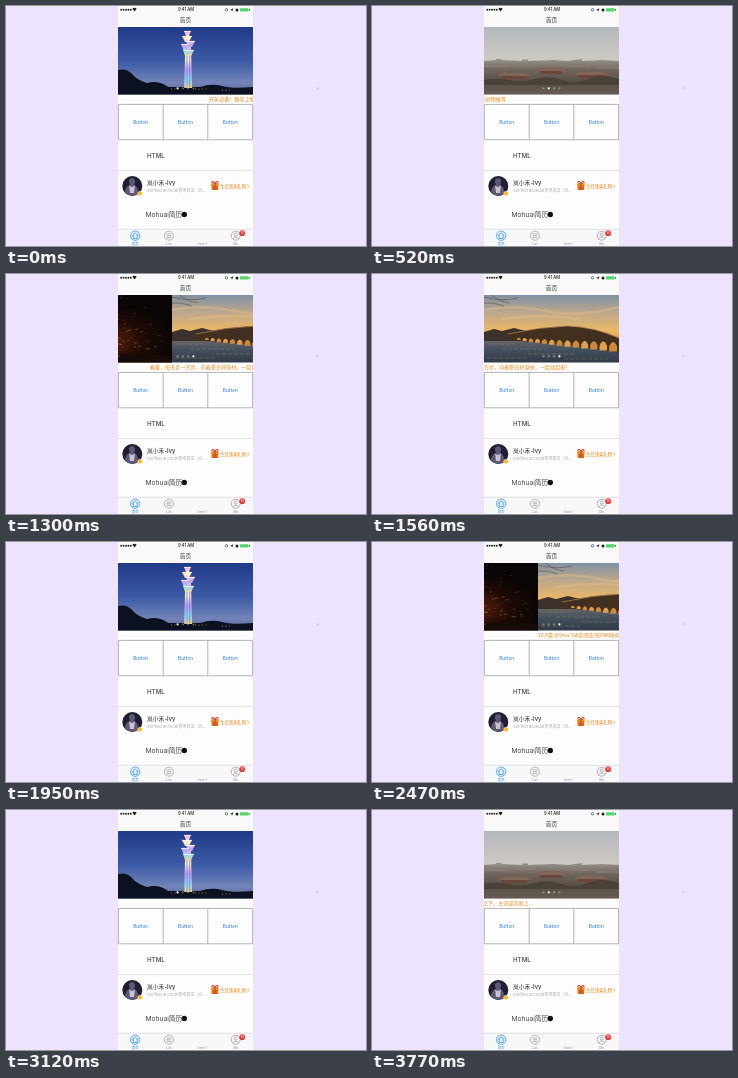
Recreate the animation shown at these times as an HTML page. Size 360 px wide and 240 px high, loop 3900 ms.

```html
<!DOCTYPE html>
<html lang="zh-CN">
<head>
<meta charset="utf-8">
<title>首页</title>
<style>
html, body { margin: 0; width: 100%; height: 100%; overflow: hidden; background: #ede3fd; }
body > svg { display: block; width: 100%; height: 100%; }
text { font-family: Inter, "Noto Sans CJK SC", "Noto Sans CJK", sans-serif; }
.mid { text-anchor: middle; }
.bold { font-weight: 500; }
#news text { font-size: 5.1px; fill: #f28a1c; font-family: "Liberation Sans", "Noto Sans CJK SC", sans-serif; }
.btn { font-size: 4.9px; fill: #2a7ff0; }
.tab { font-size: 3.4px; fill: #9a9a9f; }
</style>
</head>
<body>
<svg viewBox="0 0 360 240">
  <defs>
    <linearGradient id="night" x2="0" y2="1">
      <stop offset="0" stop-color="#203a88"/><stop offset=".5" stop-color="#3b5aa6"/>
      <stop offset=".82" stop-color="#7384b8"/><stop offset="1" stop-color="#55608f"/>
    </linearGradient>
    <linearGradient id="neon" x2="0" y2="1">
      <stop offset="0" stop-color="#f4a8ee"/><stop offset=".3" stop-color="#fff0c8"/>
      <stop offset=".55" stop-color="#c79cf5"/><stop offset=".8" stop-color="#8fd9f4"/><stop offset="1" stop-color="#f5d68a"/>
    </linearGradient>
    <linearGradient id="haze" x2="0" y2="1">
      <stop offset="0" stop-color="#b3b8bb"/><stop offset=".45" stop-color="#cbc8c3"/>
    </linearGradient>
    <linearGradient id="land" x2="0" y2="1">
      <stop offset="0" stop-color="#99948f"/><stop offset=".3" stop-color="#6f655d"/>
      <stop offset=".65" stop-color="#584e46"/><stop offset="1" stop-color="#655d55"/>
    </linearGradient>
    <radialGradient id="fire" cx=".47" cy=".68" r=".55">
      <stop offset="0" stop-color="#b35a20"/><stop offset=".22" stop-color="#4d1b0a"/>
      <stop offset=".6" stop-color="#1d0a06"/><stop offset="1" stop-color="#0a0505"/>
    </radialGradient>
    <linearGradient id="dusk" x2="0" y2="1">
      <stop offset="0" stop-color="#7f91a2"/><stop offset=".4" stop-color="#bda88d"/>
      <stop offset=".8" stop-color="#ecb864"/><stop offset="1" stop-color="#dd9c4c"/>
    </linearGradient>
    <linearGradient id="lake" x2="0" y2="1">
      <stop offset="0" stop-color="#6f6964"/><stop offset=".4" stop-color="#475260"/><stop offset="1" stop-color="#2f3945"/>
    </linearGradient>
  </defs>

  <circle cx="311.5" cy="82" r=".6" fill="#888"/>
  <rect x="112" width="135" height="240" fill="#fdfdfd"/>
  <rect x="112" width="135" height="21" fill="#f9f9fa"/>

  <!-- status bar -->
  <g fill="#222">
    <path d="M115.2 3.8H125" stroke="#222" stroke-width="1.9" stroke-linecap="round" stroke-dasharray="0 2.4"/>
    <path d="M126.3 2.7Q128.5 1 130.7 2.7L128.5 5.5Z"/>
    <text class="mid bold" x="180" y="5.3" font-size="4.2">9:41 AM</text>
    <circle cx="220.5" cy="3.8" r="1.2" fill="none" stroke="#222" stroke-width=".6"/>
    <path d="M224 4L227.4 2.2L226 5.7L225.6 4.2Z"/>
    <circle cx="231" cy="3.9" r="1.5"/>
    <rect x="234" y="2.2" width="8.6" height="3.4" rx=".7" fill="#4cd964"/>
    <rect x="243" y="3.2" width=".8" height="1.4"/>
  </g>
  <text class="mid bold" x="179.5" y="16.3" font-size="5.7" fill="#333">首页</text>

  <!-- carousel -->
  <svg x="112" y="21" width="135" height="67.5">
    <g class="page">
      <rect width="135" height="68" fill="url(#night)"/>
      <path d="M0 43Q9 41 14 47T29 56Q41 53 50 60H82Q94 56 104 59T135 60V68H0Z" fill="#0b1120"/>
      <path d="M66.3 61L67.2 20H73L74 61Z" fill="url(#neon)"/>
      <path d="M69 61V22M71.7 61V22" stroke="#5468b8" stroke-width=".6"/>
      <path d="M64 9H74L71 15H67ZM68 14H77L74 20H70ZM63 17H71L69 24H66ZM66 4H73L71 9H68ZM65 23H76L73 29H67Z" fill="url(#neon)"/>
      <path d="M64 9.4H74M68 14.4H77M63 17.4H71M66 4.4H73M65 23.4H76" stroke="#fff" stroke-width=".8"/>
      <path d="M53 62H62M77 62H91M104 63H112" stroke="#d99842" stroke-width=".8" stroke-dasharray="1 2.5"/>
    </g>
    <g class="page">
      <rect width="135" height="68" fill="url(#haze)"/>
      <path d="M0 34L12 33V32H18V33L38 34V32.5H44V34L70 33L84 34L98 32V34L118 33L135 34V68H0Z" fill="url(#land)"/>
      <path d="M0 39H24M33 38H52M84 39H106M112 41H135" stroke="#8f8078" stroke-width="1"/>
      <path d="M52 44L57 40H77L82 44ZM14 49L19 46H42L47 49ZM90 48L95 45H119L124 48Z" fill="#806656"/>
      <path d="M56 44H78V47H56ZM18 49H43V52H18ZM94 48H120V51H94Z" fill="#6c453b"/>
      <path d="M0 53Q12 50 25 53T51 52T78 53T104 52T135 52V58H0Z" fill="#4a4139"/>
    </g>
    <g class="page">
      <rect width="135" height="68" fill="url(#fire)"/>
      <g id="sparks" stroke-linecap="round"></g>
      <path d="M61.5 60L62.7 37L64 60Z" fill="#ffe7a0"/>
      <circle cx="63" cy="54" r="2.2" fill="#ffd276"/>
      <path d="M0 61Q66 57 135 61V68H0Z" fill="#170b08"/>
      <path d="M44 61H83" stroke="#8d3f17" stroke-width="1"/>
    </g>
    <g class="page">
      <rect width="135" height="45" fill="url(#dusk)"/>
      <path d="M0 15Q30 9 62 16T135 12M18 24Q58 18 96 24" stroke="#e6bc84" stroke-width="2.5" opacity=".45" fill="none"/>
      <rect y="44" width="135" height="24" fill="url(#lake)"/>
      <path d="M0 37L10 34L18 36L30 33L42 36L64 34V46H0Z" fill="#3d322b"/>
      <path d="M0 2Q18 7 34 3M0 8Q10 7 20 11M7 0L17 6L26 8" stroke="#5c4f4a" stroke-width=".6" fill="none"/>
      <path d="M24 39Q55 32 84 31Q110 32 135 43V58L84 50L24 45Z" fill="#41301f"/>
      <path d="M24 39Q55 32 84 31Q110 32 135 43" stroke="#a87c4c" stroke-width=".8" fill="none"/>
      <g id="arches"></g>
      <path d="M4 49H31M18 54H62M44 59H92M3 63H42M80 64H124" stroke="#a38a68" stroke-width=".7" stroke-dasharray="4 2" opacity=".6"/>
    </g>
    <g id="dots"></g>
  </svg>

  <svg id="news" x="112" y="88.5" width="135" height="9.5"></svg>

  <!-- buttons -->
  <path d="M112.4 98.4H246.6V133.8H112.4ZM157.2 98.4V133.8M201.8 98.4V133.8" fill="none" stroke="#979797" stroke-width=".7"/>
  <text class="btn mid" x="134.7" y="117.8">Button</text>
  <text class="btn mid" x="179.5" y="117.8">Button</text>
  <text class="btn mid" x="224.3" y="117.8">Button</text>

  <!-- rows -->
  <path d="M112 164.5H247" stroke="#d9d9dc" stroke-width=".7"/>
  <text x="141" y="151.6" font-size="6.2" fill="#444" class="bold">HTML</text>
  <circle cx="126.3" cy="180" r="10" fill="#201e32"/>
  <path d="M119 187Q119 180 124 179Q121 173 126 172Q131 173 128 179Q133 181 132 188Q126 192 119 187Z" fill="#5f5975"/>
  <path d="M123 179Q126 183 129 179L128 187H124Z" fill="#c9c3d0"/>
  <circle cx="134" cy="187.5" r="2.3" fill="#fbb817" stroke="#fff" stroke-width=".4"/>
  <text x="141" y="179" font-size="5.8" fill="#333" class="bold">岚小禾-Ivy</text>
  <text x="141" y="186.4" font-size="4.05" fill="#a9a9ad">Verified account青老真法（北…</text>
  <g>
    <rect x="205.6" y="179" width="6.6" height="5" rx=".5" fill="#df6c15"/>
    <rect x="205" y="177.6" width="7.8" height="2" rx=".4" fill="#f39325"/>
    <path d="M209 177.3Q204 177 206 175.6T209 177.3Q214 177 212 175.6T209 177.3V184" fill="none" stroke="#c8401a" stroke-width=".9"/>
  </g>
  <text x="214.2" y="182" font-size="4.3" fill="#ef8511" class="bold">生日领喜礼物</text>
  <path d="M241.3 178.2L243 180.3L241.3 182.4" fill="none" stroke="#ef8511" stroke-width=".6"/>
  <text x="139.5" y="211.4" font-size="6.7" fill="#444">Mohuai简历</text>
  <circle cx="178.3" cy="208.5" r="2.7" fill="#111"/>

  <!-- tab bar -->
  <rect x="112" y="223" width="135" height="17" fill="#f8f8f9"/>
  <path d="M112 223.2H247" stroke="#cfcfd3" stroke-width=".6"/>
  <g fill="none" stroke-width=".7">
    <g stroke="#2a8cf0">
      <circle cx="129.2" cy="229.7" r="4.7" fill="#e3f1ff"/>
      <path d="M126 229.8L129.2 226.8L132.4 229.8M127.2 229V232.5H131.2V229"/>
    </g>
    <g stroke="#97979c">
      <circle cx="162.9" cy="229.7" r="4.5"/>
      <path d="M160.5 228H165.3M160.5 229.8H165.3M160.5 231.6H165.3"/>
      <circle cx="229.7" cy="229.7" r="4.5"/>
      <circle cx="229.7" cy="228.5" r="1.5"/>
      <path d="M226.7 232.8Q229.7 229 232.7 232.8"/>
    </g>
  </g>
  <circle cx="236.2" cy="227.2" r="2.9" fill="#e23d38"/>
  <text class="mid" x="236.2" y="228.4" font-size="3.2" fill="#fff">10</text>
  <text class="tab mid" x="129.2" y="238.5" style="fill:#2a8cf0;font-weight:500">首页</text>
  <text class="tab mid" x="162.9" y="238.5">List</text>
  <text class="tab mid" x="196.3" y="238.5">Item 1</text>
  <text class="tab mid" x="229.7" y="238.5">Me</text>
</svg>
<script>
const LOOP = 3900, STEP = 130, WIDTH = 135, SPEED = 0.26;
const $ = id => document.getElementById(id);

function add(parent, tag, attrs, text = "") {
  const el = document.createElementNS("http://www.w3.org/2000/svg", tag);
  for (const key in attrs) el.setAttribute(key, attrs[key]);
  el.textContent = text;
  parent.append(el);
  return el;
}

let seed = 17;
const rand = () => (seed = seed * 16807 % 2147483647) / 2147483647;

for (let i = 0; i < 190; i++) {
  const angle = -Math.PI * (rand() * 1.3 - 0.15);
  const dist = 4 + 58 * rand() ** 1.5;
  const len = 0.5 + 2.5 * rand();
  const at = r => `${63 + Math.cos(angle) * r} ${44 + Math.sin(angle) * r * 0.75}`;
  add($("sparks"), "path", {
    d: `M${at(dist)}L${at(dist + len)}`,
    stroke: ["#e07c32", "#f7c073", "#a0461c"][i % 3],
    "stroke-width": 0.3 + 0.4 * rand(),
    opacity: 1 - dist / 90
  });
}

// arches widen toward the viewer
for (let i = 0, x = 33; i < 13; i++) {
  const w = 3.6 + i * 0.36, h = 2.5 + i * 0.62;
  const base = 45 + i * 0.95;
  add($("arches"), "path", {
    d: `M${x} ${base}V${base - h * 0.5}Q${x + w / 2} ${base - h * 1.4} ${x + w} ${base - h * 0.5}V${base}Z`,
    fill: i % 2 ? "#e0a04c" : "#cc8a3e"
  });
  x += w + 2.1;
}

const pages = [...document.querySelectorAll(".page")];
const dots = pages.map((_, i) => add($("dots"), "circle", { cx: 59.5 + i * 5.3, cy: 61.3, r: 1.1, fill: "#fff" }));

// middle of each page turn, in ms
const turns = [390, 780, 1300, 1820, 2080, 2275, 2470, 2860, 3510];

// text, anchor, position and the time it is there
const news = [
  ["开年必备！数手上新好物推荐", "start", 91, 0],
  ["春暖，每天走一万步，向着夏日好身材，一起动起来！", "end", 86.5, 1560],
  ["10.5英寸Orva Tab实测支持29W快充", "start", 54, 2470],
  ["市场低迷之下，主流逆流而上...", "end", 49, 3770]
].map(([text, anchor, x, time]) => ({
  x, time, el: add($("news"), "text", { y: 6.6, "text-anchor": anchor }, text)
}));

function draw(t) {
  const pos = turns.reduce((sum, c) => sum + Math.min(1, Math.max(0, (t - c + 120) / 200)), 0);
  pages.forEach((page, i) => {
    const slot = ((i - pos + 1) % 4 + 4) % 4 - 1;
    page.setAttribute("transform", `translate(${slot * WIDTH})`);
  });
  const active = Math.ceil(pos) % 4;
  dots.forEach((dot, i) => dot.setAttribute("opacity", i === active ? 1 : 0.35));
  for (const n of news) n.el.setAttribute("x", n.x - SPEED * (t - n.time));
}

const start = performance.now();
function frame() {
  const t = (performance.now() - start) % LOOP;
  draw(Math.floor(t / STEP) * STEP);
  requestAnimationFrame(frame);
}
frame();
</script>
</body>
</html>
```
